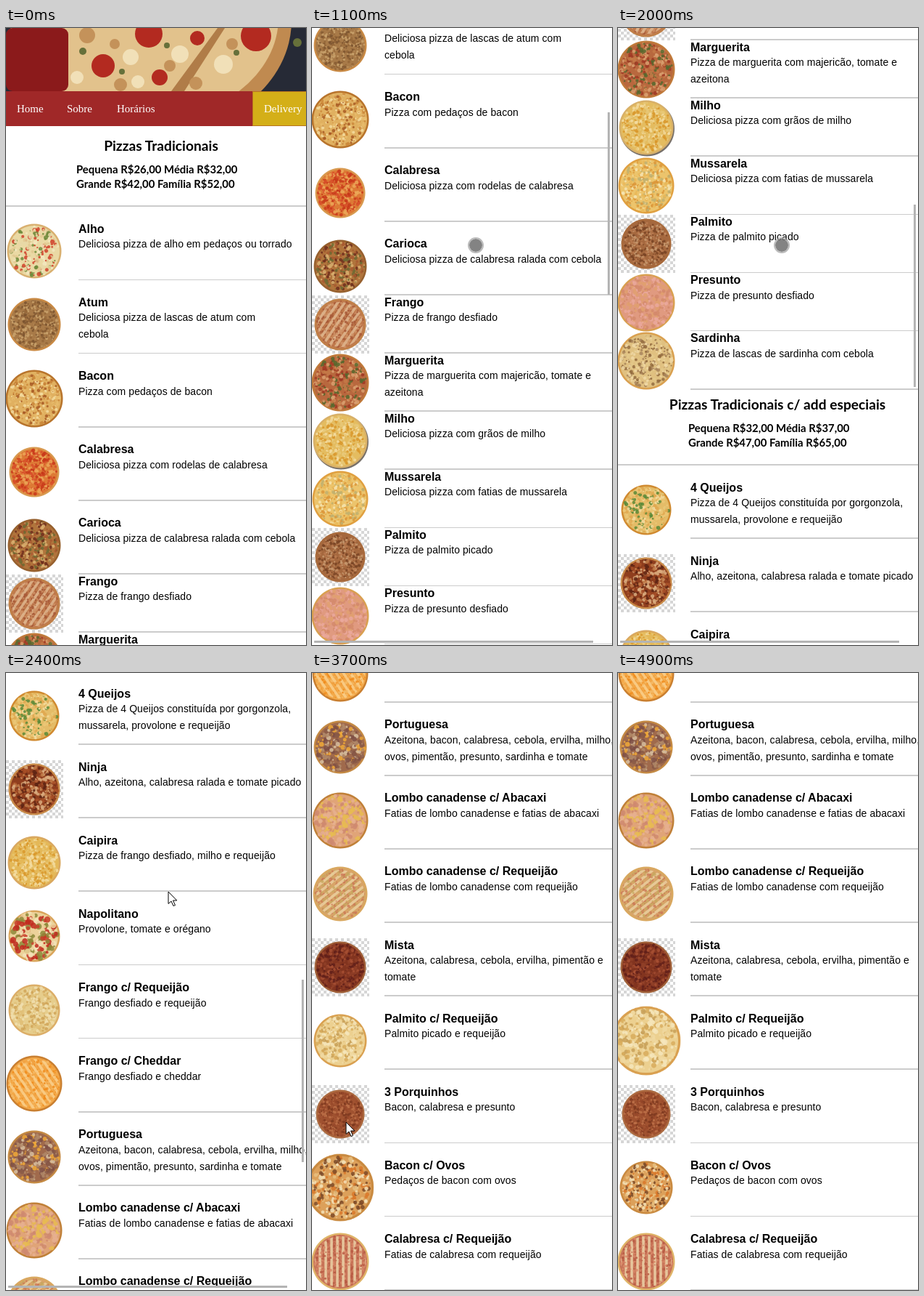
Recreate the animation shown at these times as an HTML page with a canvas. Size 414 px wide and 849 px high, loop 5600 ms.

```html
<!DOCTYPE html>
<html lang="pt-BR">
<head>
<meta charset="utf-8">
<title>Cardápio</title>
<style>
html, body { margin: 0; width: 100%; height: 100%; overflow: hidden; background: #fff; }
#stage { position: relative; width: 414px; height: 849px; overflow: hidden; color: #000; }
#page { position: absolute; left: 0; top: 0; width: 414px; height: 2832px; }
#page div, #page canvas, #page svg, #stage > .ui { position: absolute; white-space: pre; }
.logo { width: 86px; height: 87px; border-radius: 9px; background: #8b1a1b; }
.nav { top: 87px; width: 414px; height: 48px; background: #a02828; color: #fff; font: 15px/48px "Liberation Serif", serif; }
.gold { left: 340px; width: 74px; height: 46px; background: #d4af18; border: solid #b8741f; border-width: 1px 0 1px 1px; }
.head { left: 0; text-align: center; font: bold 19.2px/24px Lato, sans-serif; }
.price { left: 97px; font: bold 14.9px/20px Lato, sans-serif; }
.line { right: 0; height: 1.7px; background: #ccc; }
.title { left: 100px; font: bold 16px/22px "Liberation Sans", Arial, sans-serif; }
.desc { left: 100px; font: 14px/22.5px "Liberation Sans", Arial, sans-serif; letter-spacing: .08px; }
canvas { left: 0; width: 79px; height: 80px; }
.bar { background: #b4b4b4; }
#vbar { left: 408px; width: 3px; height: 251px; top: 0; }
#hbar { left: 3px; top: 843px; width: 385px; height: 3px; }
#dot { left: 215px; top: 288px; width: 18px; height: 18px; border: 2.5px solid rgba(170,170,170,.8); border-radius: 50%; background: rgba(110,110,110,.85); background-clip: padding-box; }
#arrow { left: -1px; top: -1px; }
</style>
</head>
<body>
<div id="stage">
  <div id="page">
    <svg width="414" height="87" style="left:0;top:0">
      <rect width="414" height="87" fill="#262a36"/>
      <ellipse cx="200" cy="-10" rx="194" ry="156" fill="#c08a50"/>
      <ellipse cx="192" cy="-14" rx="184" ry="142" fill="#e2c28c"/>
      <path d="M228 87L292 0L302 0L246 87Z" fill="#b07c48"/>
      <g fill="#c4925a">
        <circle cx="112" cy="10" r="11"/><circle cx="158" cy="78" r="9"/><circle cx="226" cy="52" r="8"/>
        <circle cx="262" cy="76" r="9"/><circle cx="312" cy="22" r="8"/><circle cx="150" cy="22" r="7"/>
      </g>
      <g fill="#b32a20">
        <circle cx="134" cy="52" r="16"/><circle cx="197" cy="8" r="19"/>
        <circle cx="345" cy="11" r="21"/><circle cx="212" cy="68" r="11"/><circle cx="264" cy="14" r="10"/>
      </g>
      <g fill="#f1e0b8">
        <circle cx="172" cy="40" r="11"/><circle cx="240" cy="36" r="12"/>
        <circle cx="300" cy="50" r="13"/><circle cx="182" cy="74" r="9"/><circle cx="98" cy="68" r="9"/>
      </g>
      <g fill="#66703a">
        <circle cx="106" cy="32" r="5"/><circle cx="160" cy="60" r="4"/><circle cx="222" cy="24" r="4"/>
        <circle cx="318" cy="34" r="4"/><circle cx="402" cy="20" r="6"/>
      </g>
    </svg>
    <div class="logo"></div>
    <div class="nav"><div class="gold"></div></div>
  </div>
  <div id="vbar" class="ui bar"></div>
  <div id="hbar" class="ui bar"></div>
  <div id="dot" class="ui"></div>
  <svg id="arrow" class="ui" width="15" height="22"><path transform="translate(1 1)" d="M0 0V16.5L4 13L7 19.5L9.5 18.5L6.5 12H11.8Z" fill="#fff" stroke="#000"/></svg>
</div>
<script>
const $ = id => document.getElementById(id);
const page = $('page');

// title, description, radius, colours (crust, base, toppings), options
const menu = [
  ['Alho', 'Deliciosa pizza de alho em pedaços ou torrado', 38, 'd9b070 ead9a4 f3e8c0 e0c890 ead9a4 e8d8a8 d0402a 6d8a3a', {size: 3.2}],
  ['Atum', 'Deliciosa pizza de lascas de atum com\ncebola', 37, 'c98a45 a87a48 7d5530 c9a26c 946638'],
  ['Bacon', 'Pizza com pedaços de bacon', 40, 'b8742c e0b060 a85a24 f3dca0 e8bc6c cc8a3c', {size: 2.4}],
  ['Calabresa', 'Deliciosa pizza com rodelas de calabresa', 35, 'd89a50 dd7a35 c8381a eca858 d8502a', {size: 2.6}],
  ['Carioca', 'Deliciosa pizza de calabresa ralada com cebola', 37, '96602e b0743c 6e2e1c d9b070 6d6a32 a85a30', {size: 2.6}],
  ['Frango', 'Pizza de frango desfiado', 36, 'c08048 c07a4c a85a38 d09468 e0b890', {angle: .6, check: 1}],
  ['Marguerita', 'Pizza de marguerita com majericão, tomate e\nazeitona', 40, 'c07a3a b8683e 56692e d9a070 a03a24 c47a48', {size: 3}],
  ['Milho', 'Deliciosa pizza com grãos de milho', 38, 'd8b068 e4bc60 d9982c f3dca0 e8c878', {shade: 1, size: 2.4}],
  ['Mussarela', 'Deliciosa pizza com fatias de mussarela', 39, 'e0a040 ecc46c f6e4b0 eab858 dc963a c0b070', {size: 2.4}],
  ['Palmito', 'Pizza de palmito picado', 35, 'a86a3c a5683e c89a70 7a4526 b87a50', {check: 1}],
  ['Presunto', 'Pizza de presunto desfiado', 40, 'd9a050 e09a80 eaa89c d48a6c e0a070', {size: 3}],
  ['Sardinha', 'Pizza de lascas de sardinha com cebola', 40, 'd9a050 e0c080 a8845a 946c40 f0d8a4 e3c88a', {size: 2.6}],
  ['4 Queijos', 'Pizza de 4 Queijos constituída por gorgonzola,\nmussarela, provolone e requeijão', 35, 'd08a30 e4bc68 5a8a38 f3dca0 e0a850 ecc878', {size: 2.8}],
  ['Ninja', 'Alho, azeitona, calabresa ralada e tomate picado', 36, 'c88a48 8f3e1e 5d2414 c07a48 a85028 dcae80', {check: 1, size: 2.6}],
  ['Caipira', 'Pizza de frango desfiado, milho e requeijão', 37, 'd9a860 e4b858 d9982c f3dca0 e8c470', {size: 2.4}],
  ['Napolitano', 'Provolone, tomate e orégano', 36, 'd9a45a ecd29a c02a1e f3e4ba c83c28 ecd29a 8d8a3a', {size: 4.5}],
  ['Frango c/ Requeijão', 'Frango desfiado e requeijão', 36, 'dcae68 e6cd8c d0a458 f0deae e0c078', {size: 2.6}],
  ['Frango c/ Cheddar', 'Frango desfiado e cheddar', 39, 'c97f30 f3a848 f0a040 f4b864 f08c1c fbd08c', {angle: -.6}],
  ['Portuguesa', 'Azeitona, bacon, calabresa, cebola, ervilha, milho,\novos, pimentão, presunto, sardinha e tomate', 37, 'c48a44 a06a4c 7e4f45 efa838 b08868 8a5a48 d8c0a0', {size: 3.6}],
  ['Lombo canadense c/ Abacaxi', 'Fatias de lombo canadense e fatias de abacaxi', 39, 'c08038 e0a478 e8bc50 cf8a70 e6b090', {size: 3.6}],
  ['Lombo canadense c/ Requeijão', 'Fatias de lombo canadense com requeijão', 38, 'd9a860 d8a468 cc7c58 c8a860 ecd0a0', {angle: .9}],
  ['Mista', 'Azeitona, calabresa, cebola, ervilha, pimentão e\ntomate', 36, 'a06038 82341f 62201a a85034 8f4028', {check: 1, size: 2.4}],
  ['Palmito c/ Requeijão', 'Palmito picado e requeijão', 37, 'd9a050 ecd090 f6e6bc d8ac5c c8a058 f0d8a0', {size: 3}],
  ['3 Porquinhos', 'Bacon, calabresa e presunto', 34, 'ac6a40 a05230 7e3a20 bc7048 96482a', {check: 1}],
  ['Bacon c/ Ovos', 'Pedaços de bacon com ovos', 37, 'c98a40 dca05a 7d4a28 f3e2b8 d9782a e8c080', {size: 2.6}],
  ['Calabresa c/ Requeijão', 'Fatias de calabresa com requeijão', 40, 'dfb468 c87458 b85c44 d88868 ecd4a8', {angle: 0}]
];

// Separator line below row i; every other part of a row hangs from it
const lineY = i => i < 5 ? 345.52 + 101.15 * i : i < 12 ? 750.12 + 80.11 * (i - 4) : 1516.22 + 101.12 * (i - 12);
const rowY = i => lineY(i) - 68.7;

function add(cls, top, text = '', style = {}, parent = page) {
  const el = document.createElement('div');
  el.className = cls;
  el.style.top = top + 'px';
  el.textContent = text;
  Object.assign(el.style, style);
  parent.append(el);
}

function random(seed) {
  return () => (seed = (seed * 16807) % 2147483647) / 2147483647;
}

function pizza(i, r, colors, {size = 2, angle, check, shade}) {
  const cv = document.createElement('canvas'), g = cv.getContext('2d');
  const rnd = random(7919 * (i + 3));
  const [crust, base, ...tops] = colors.split(' ').map(c => '#' + c);
  const disc = (x, y, rad, fill) => {
    g.fillStyle = fill;
    g.beginPath();
    g.arc(x, y, rad, 0, 7);
    g.fill();
  };
  const scatter = n => {
    while (n-- > 0) {
      const a = rnd() * 6.283, d = Math.sqrt(rnd()) * (r - 4);
      disc(Math.cos(a) * d, Math.sin(a) * d, size * (.3 + .7 * rnd()), tops[rnd() * tops.length | 0]);
    }
  };
  cv.width = 158;
  cv.height = 160;
  g.scale(2, 2);
  if (check) {
    g.fillStyle = '#d6d6d6';
    for (let n = 0; n < 400; n++)
      if ((n % 20 + (n / 20 | 0)) % 2 === 0) g.fillRect(n % 20 * 4, (n / 20 | 0) * 4, 4, 4);
  }
  g.translate(39, 40);
  if (shade) disc(1, 1.5, r, '#77706a');
  disc(0, 0, r - .5, crust);
  disc(0, 0, r - 3, base);
  const stripe = angle === undefined ? null : tops.pop();
  g.globalAlpha = .85;
  scatter(900 / size);
  if (stripe) {
    g.save();
    g.beginPath();
    g.arc(0, 0, r - 5, 0, 7);
    g.clip();
    g.rotate(angle);
    g.fillStyle = stripe;
    for (let x = -36; x < 40; x += 8) g.fillRect(x - 1.8, -40, 3.6, 80);
    g.restore();
    scatter(80);
  }
  cv.style.top = Math.round(rowY(i) - 9.5) + 'px';
  page.append(cv);
  return cv;
}

const nav = document.querySelector('.nav');
[['Home', 15], ['Sobre', 84], ['Horários', 153], ['Delivery', 356]].forEach(([s, x]) => add('', 0, s, {left: x + 'px'}, nav));

function section(y, width, name, prices) {
  add('head', y, name, {width: width + 'px'});
  add('price', y + 34, prices);
  add('line', y + 94, '', {left: 0, height: '2px'});
}
section(150, 428, 'Pizzas Tradicionais', 'Pequena R$26,00 Média R$32,00\nGrande R$42,00 Família R$52,00');
section(1321, 440, 'Pizzas Tradicionais c/ add especiais', 'Pequena R$32,00 Média R$37,00\nGrande R$47,00 Família R$65,00');

menu.forEach(([name, text], i) => {
  const y = rowY(i);
  add('line', lineY(i), '', {left: '100px'});
  add('title', Math.round(y - 11), name);
  add('desc', Math.round(y + 9.5), text);
});
const pies = menu.map(([, , r, colors, opts = {}], i) => pizza(i, r, colors, opts));

// Linear interpolation over [time, ...values] keys
function at(keys, t) {
  const n = keys.findIndex(k => k[0] > t);
  if (n < 0) return keys[keys.length - 1].slice(1);
  if (!n) return keys[0].slice(1);
  const a = keys[n - 1], b = keys[n], p = (t - a[0]) / (b[0] - a[0]);
  return a.slice(1).map((v, j) => v + (b[j + 1] - v) * p);
}

const scrollKeys = [[800, 0], [900, 90], [1000, 260], [1100, 384], [1300, 384], [1400, 490], [1500, 640], [1600, 640],
  [1700, 716], [1800, 768], [1900, 768], [2000, 815], [2400, 1419], [2600, 1820], [2700, 1983]];
const cursorKeys = [[300, 62, 213], [600, 249, 290], [800, 226, 300], [2400, 224, 301], [2800, 224, 301], [2900, 225, 295],
  [3000, 225, 295], [3100, 205, 310], [3400, 60, 680], [3500, 45, 700], [3600, 46, 587], [3700, 47, 618], [3800, 46, 680],
  [4000, 45, 700], [4100, 45, 700], [4300, 45, 625], [4500, 45, 600], [4700, 42, 510]];
const zoomKeys = {
  22: [[4500, 1], [4600, 1.05], [4700, 1.2], [4800, 1.27], [4900, 1.3]],
  23: [[4200, 1], [4500, 1.3], [4600, 1.3], [4700, 1.24], [4900, 1]],
  24: [[3400, 1], [3700, 1.27], [3800, 1.3], [4100, 1.3], [4500, 1]]
};

function draw(now) {
  const t = Math.floor(now % 5600 / 100) * 100;
  const y = Math.round(at(scrollKeys, t)[0]);
  page.style.transform = `translateY(${-y}px)`;
  for (const i in zoomKeys) pies[i].style.transform = `scale(${at(zoomKeys[i], t)[0]})`;

  $('vbar').style.transform = `translateY(${Math.round(2 + y * .2962)}px)`;
  $('vbar').style.opacity = $('hbar').style.opacity = t < 900 || t >= 3100 ? 0 : t < 2900 ? 1 : .5;

  const touch = t >= 900 && t < 2400;
  const [cx, cy] = at(cursorKeys, t).map(Math.round);
  $('dot').style.opacity = touch ? 1 : 0;
  $('arrow').style.opacity = touch || t < 300 || t >= 4800 ? 0 : 1;
  $('arrow').style.transform = `translate(${cx}px, ${cy}px)`;
  requestAnimationFrame(() => draw(performance.now() - start));
}
const start = performance.now();
draw(0);
</script>
</body>
</html>
```
